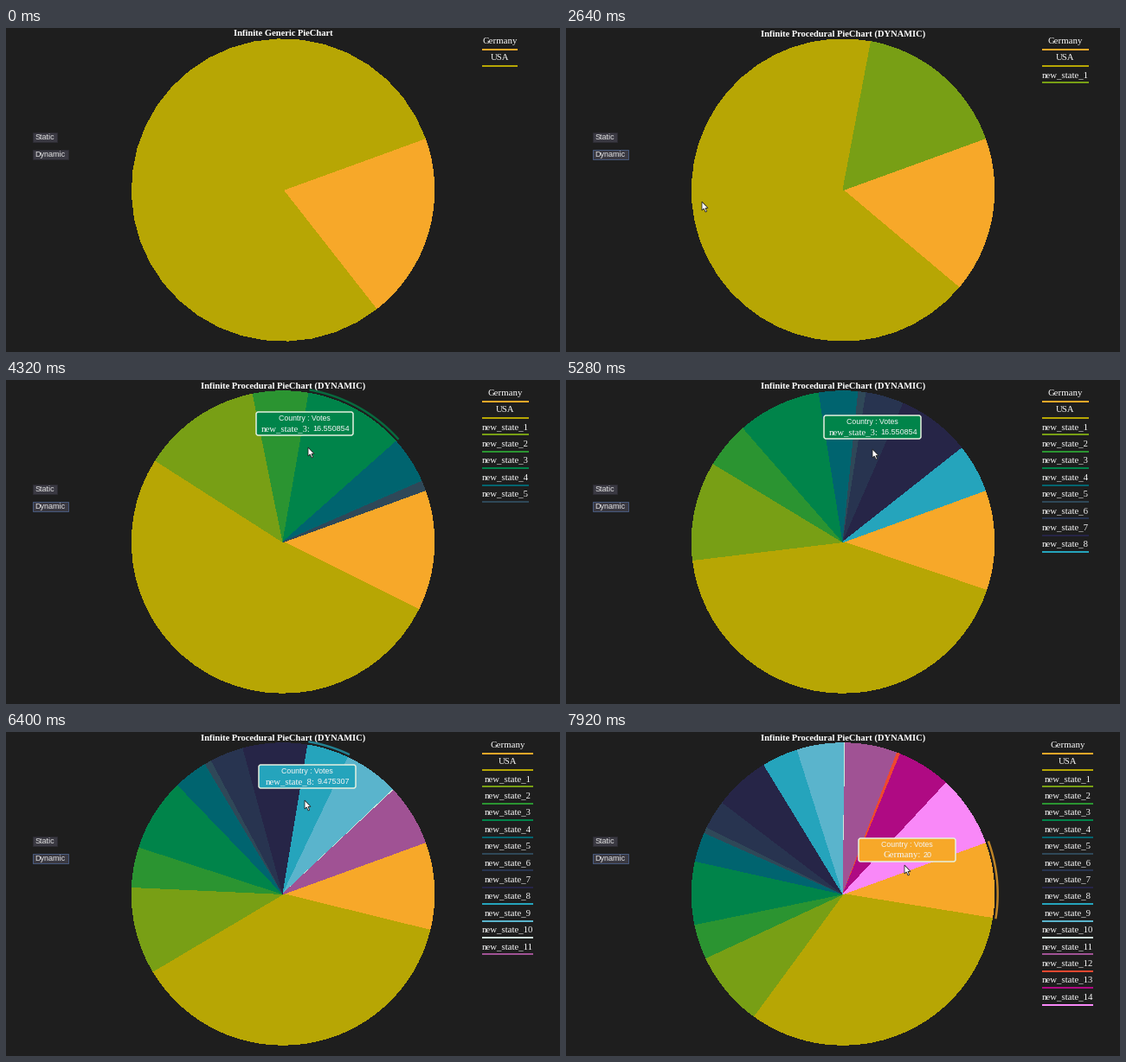
A matplotlib script for the animation above (8 s loop, 640 by 375 pixels).

```python
import numpy as np
import matplotlib.pyplot as plt
from matplotlib.animation import FuncAnimation
from matplotlib.patches import FancyBboxPatch, Polygon, Rectangle

W, H, DPI = 640, 375, 100
FRAMES, INTERVAL = 100, 80
PX = 72 / DPI
CENTER, RADIUS, START = np.array([W / 2, H / 2]), 174.7, -20
BG, INK = "#1e1e1e", "#f4f4f4"
SERIF, SANS = "Liberation Serif", "Liberation Sans"

# Votes and colour of each slice, in order of appearance
SLICES = [
    ("Germany", 20, "#f7a829"), ("USA", 80, "#b7a604")
] + [(f"new_state_{i}", votes, color) for i, (votes, color) in enumerate([
    (19.720867, "#789f15"), (9.159267, "#2b9431"), (16.550854, "#00844a"),
    (7.75, "#00646f"), (1.55, "#2f4858"), (7.6, "#283450"),
    (14.6, "#262547"), (9.475307, "#25a4bc"), (12.4, "#5ab4cc"),
    (0.2, "#cfe8dc"), (13.7, "#a05294"), (0.9, "#ee4830"),
    (14.1, "#af0a83"), (18.55, "#f988f8")], start=1)]
NAMES, VOTES, COLORS = zip(*SLICES)

SHOW_CURSOR, CLICK_STATIC, CLICK_DYNAMIC = 1, 14, 24
FIRST_NEW, NEW_EVERY = 30, 5
BUTTONS = [("Static", 120, 29), ("Dynamic", 140, 42)]

# Eased cursor moves: first frame, last frame, goal
ENTRY = (215, 352)
MOVES = [(1, 8, (174, 282)), (9, 10, (62, 147)), (11, 15, (46, 126)),
         (19, 22, (54, 148)), (28, 36, (205, 225)), (36, 41, (304, 56)),
         (42, 57, (354, 80)), (69, 75, (374, 60)), (75, 80, (345, 79)),
         (80, 84, (247, 91)), (84, 89, (218, 168)), (89, 94, (420, 231)),
         (94, 99, (391, 154))]

ARROW = np.array([(0, 0), (0, 10), (2.3, 8), (4.1, 12), (5.6, 11.3),
                  (4, 7.4), (7, 7.4)])

fig = plt.figure(figsize=(W / DPI, H / DPI), dpi=DPI, facecolor=BG)
ax = fig.add_axes([0, 0, 1, 1])


def cursor_at(frame):
    pos = np.array(ENTRY, float)
    for first, last, goal in MOVES:
        t = np.clip((frame - first) / (last - first), 0, 1)
        pos += (np.array(goal) - pos) * t * t * (3 - 2 * t)
    return np.round(pos)


def slice_count(frame):
    added = (frame - FIRST_NEW) // NEW_EVERY + 1
    return 2 + min(len(SLICES) - 2, max(0, added))


def bounds(count):
    share = np.cumsum((0,) + VOTES[:count]) / sum(VOTES[:count])
    return START + 360 * share


def arc(a, b, radius):
    t = np.radians(np.linspace(a, b, 33))
    return CENTER + radius * np.column_stack([np.cos(t), np.sin(t)])


def write(x, y, text, size, family=SERIF, ha="center", z=4, color=INK, **kw):
    return ax.text(x, y, text, fontsize=size * PX, family=family, ha=ha,
                   va="baseline", zorder=z, color=color, **kw)


def hovered(frame):
    """Index of the slice under the pointer and whether it is still current."""
    if frame < CLICK_DYNAMIC:
        return None, False
    moved = frame
    while moved > 1 and np.array_equal(cursor_at(moved), cursor_at(moved - 1)):
        moved -= 1
    dx, dy = cursor_at(frame - 1) - CENTER
    if np.hypot(dx, dy) > RADIUS:
        return None, False
    angle = (np.degrees(np.arctan2(dy, dx)) - START) % 360 + START
    count = slice_count(moved)
    index = int(np.searchsorted(bounds(count), angle, side="right")) - 1
    return min(index, count - 1), slice_count(frame) == count


def draw_pie(count):
    edges = bounds(count)
    for a, b, color in zip(edges, edges[1:], COLORS):
        ax.add_patch(Polygon(np.vstack([CENTER, arc(a, b, RADIUS)]),
                             fc=color, ec="none", aa=False, zorder=1))


def draw_legend(count):
    width = 41 if count == 2 else 54 if count < 12 else 59
    for i in range(count):
        y = 19.4 * i
        write(550 + width / 2, 18 + y, NAMES[i], 10.8)
        ax.add_patch(Rectangle((550, round(23.6 + y)), width, 2,
                               fc=COLORS[i], ec="none", zorder=3))


def draw_buttons(frame):
    x, y = cursor_at(frame)
    focus = (None if frame < CLICK_STATIC else
             "Static" if frame < CLICK_DYNAMIC else "Dynamic")
    left = 30
    for text, top, width in BUTTONS:
        over = (frame >= SHOW_CURSOR and left <= x <= left + width
                and top <= y <= top + 12)
        fill = "#4c4656" if over else "#3a3942"
        edge = "#47597c" if focus == text else "#2c2b32"
        ax.add_patch(Rectangle((left + 0.5, top + 0.5), width - 1, 11,
                               fc=fill, ec=edge, lw=PX, zorder=3))
        write(left + width / 2, top + 8.9, text, 9, SANS, color="#e2e2e2")


def draw_title(frame):
    if frame < CLICK_STATIC:
        title = "Infinite Generic PieChart"
    elif frame < CLICK_DYNAMIC:
        title = "Infinite Generic PieChart (STATIC)"
    else:
        title = "Infinite Procedural PieChart (DYNAMIC)"
    write(320, 9.4, title, 10.45, weight="bold", color="white")


def draw_hover(frame, index, current, count):
    color = COLORS[index]
    if current:
        a, b = bounds(count)[index:index + 2]
        ax.plot(*arc(a, b, RADIUS + 4).T, color=color, alpha=0.75,
                lw=2.4 * PX, solid_capstyle="butt", zorder=2)
    x, y = cursor_at(frame - 1)
    ax.add_patch(FancyBboxPatch((x - 56, y - 39), 112, 27,
                                boxstyle="round,pad=0,rounding_size=2.5",
                                fc=color, ec="#e6f0e0", lw=1.5 * PX, zorder=5))
    write(x, y - 29.3, "Country : Votes", 8.8, SANS, z=6)
    label = write(x, y - 16.8, NAMES[index] + ":", 10.8, ha="left", z=6)
    value = write(x, y - 16.8, f"{VOTES[index]:.8g}", 9, SANS, ha="left", z=6)
    widths = [t.get_window_extent().width for t in (label, value)]
    left = x + 0.5 - (sum(widths) + 2.5) / 2
    label.set_x(left)
    value.set_x(left + widths[0] + 2.5)


def draw(frame):
    ax.cla()
    ax.set(xlim=(0, W), ylim=(H, 0))
    ax.axis("off")
    count = slice_count(frame)
    draw_pie(count)
    draw_legend(count)
    draw_buttons(frame)
    draw_title(frame)
    index, current = hovered(frame)
    if index is not None:
        draw_hover(frame, index, current, count)
    if frame >= SHOW_CURSOR:
        ax.add_patch(Polygon(cursor_at(frame) + ARROW, fc="white",
                             ec="#202020", lw=0.8 * PX, zorder=8))
    return []


anim = FuncAnimation(fig, draw, frames=FRAMES, interval=INTERVAL,
                     init_func=lambda: [], repeat=True, repeat_delay=0)
plt.show()
```
